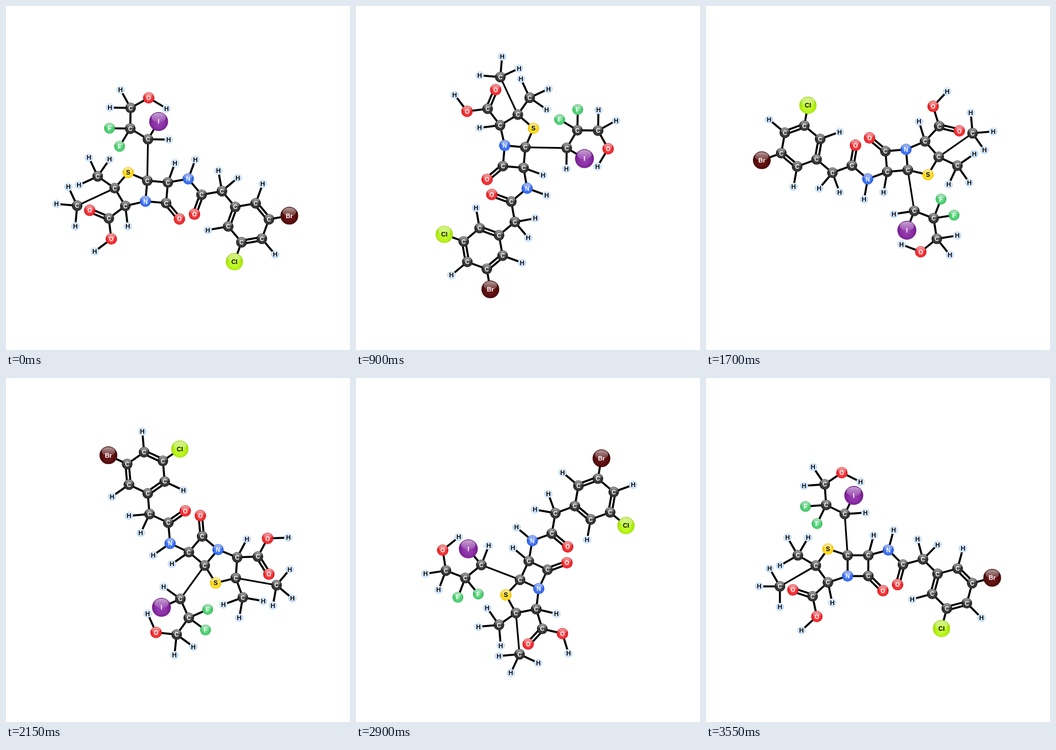
An HTML page for the animation above (3600 ms loop, 600 px wide and 600 px high).

```html
<!DOCTYPE html>
<html lang="en">
<head>
<meta charset="utf-8">
<title>Rotating molecule</title>
<style>
  html, body { margin: 0; width: 100%; height: 100%; overflow: hidden; background: #fff; }
  svg { display: block; width: 600px; height: 600px; }
  line { stroke: #000; }
  text { font: bold 11px "Liberation Sans", Arial, Helvetica, sans-serif; text-anchor: middle; }
</style>
</head>
<body>
<svg id="stage" viewBox="0 0 600 600">
  <defs>
    <linearGradient id="gloss" x1="0" y1="0" x2="0" y2="1">
      <stop offset="0" stop-color="#fff" stop-opacity=".6"/>
      <stop offset="1" stop-color="#fff" stop-opacity=".1"/>
    </linearGradient>
  </defs>
  <g id="bonds"></g>
  <g id="atoms"></g>
</svg>
<script>
const CENTER = 300, BOND = 36.1, STEPS = 72, STEP_MS = 50;
const RAD = Math.PI / 180;

// radius, inner colour, middle colour, rim colour, label colour
const ELEMENTS = {
  H:  [7.3, '#e2efff', '#d0e5ff', '#b9d7fb', '#000'],
  C:  [9.3, '#4a4a4a', '#363636', '#202020', '#fff'],
  N:  [9.8, '#5588ff', '#3f72f2', '#2858d8', '#fff'],
  O:  [10, '#ff5050', '#f03236', '#d8181e', '#fff'],
  F:  [9.5, '#6be08a', '#50d075', '#38b85c', '#fff'],
  S:  [10, '#ffe84a', '#ffdc20', '#efc008', '#000'],
  Cl: [15, '#cbff3c', '#b9f51c', '#9fdc08', '#000'],
  Br: [15.5, '#701c1c', '#5c1010', '#420606', '#fff'],
  I:  [16.5, '#9c44b4', '#8a2ea4', '#701c8a', '#fff']
};

const bondLayer = document.getElementById('bonds');
const atomLayer = document.getElementById('atoms');
const defs = document.querySelector('defs');
const atoms = [];

function make(tag, attrs, parent) {
  const node = document.createElementNS('http://www.w3.org/2000/svg', tag);
  for (const key in attrs) node.setAttribute(key, attrs[key]);
  return parent.appendChild(node);
}

function link(a, b, order = 1) {
  const dx = b.x - a.x, dy = b.y - a.y, len = Math.hypot(dx, dy);
  const width = len > BOND * 1.5 ? 3 : 3.5;
  for (const off of order === 2 ? [-3, 3] : [0]) {
    const ox = -dy / len * off, oy = dx / len * off;
    make('line', {
      x1: a.x + ox, y1: a.y + oy, x2: b.x + ox, y2: b.y + oy, 'stroke-width': width
    }, bondLayer);
  }
}

function place(el, x, y) {
  const [r, , , , ink] = ELEMENTS[el];
  const node = make('g', {}, atomLayer);
  make('circle', { r, fill: `url(#ball${el})` }, node);
  make('ellipse', { cy: -r * .42, rx: r * .76, ry: r * .5, fill: 'url(#gloss)' }, node);
  const size = ink === '#fff' && el.length === 1 ? 10.5 : 11;
  make('text', { y: 3.9, fill: ink, style: `font-size:${size}px` }, node).textContent = el;
  const atom = { x, y, node };
  atoms.push(atom);
  return atom;
}

function grow(el, from, deg, order = 1, reach = 1) {
  const d = BOND * reach, a = deg * RAD;
  const atom = place(el, from.x + d * Math.cos(a), from.y + d * Math.sin(a));
  link(from, atom, order);
  return atom;
}

const hydrogens = (from, ...degs) => degs.forEach(deg => grow('H', from, deg));

for (const el in ELEMENTS) {
  const g = make('radialGradient', { id: 'ball' + el, cy: '.58' }, defs);
  [0, .6, 1].forEach((offset, i) =>
    make('stop', { offset, 'stop-color': ELEMENTS[el][i + 1] }, g));
}

// fused four- and five-membered rings
const hub = place('C', 247, 309.3);
const alpha = grow('C', hub, 0);
const lactam = grow('C', alpha, 90);
const ringN = grow('N', lactam, 180);
link(ringN, hub);
const sulfur = grow('S', hub, 198);
const quat = grow('C', sulfur, 126);
const acidBase = grow('C', ringN, 162);
link(quat, acidBase);
grow('O', lactam, 45, 2);
hydrogens(alpha, 285);

// amide side chain
const amideN = grow('N', alpha, 345);
hydrogens(amideN, 285);
const amideC = grow('C', amideN, 45);
grow('O', amideC, 105, 2);
const bridge = grow('C', amideC, 345);
hydrogens(bridge, 255, 315);

// six-membered ring
const ring = [grow('C', bridge, 45)];
for (let i = 0; i < 5; i++) ring.push(grow('C', ring[i], 345 + 60 * i, 1 + i % 2));
link(ring[5], ring[0], 2);
['H', 'Br', 'H', 'Cl', 'H'].forEach((el, i) => grow(el, ring[i + 1], 285 + 60 * i));

// methyl groups
hydrogens(grow('C', quat, 210), 240, 300, 150);
hydrogens(grow('C', quat, 150, 1, 2), 240, 180, 90);

// acid group
const acid = grow('C', acidBase, 138);
grow('O', acid, 198, 2);
hydrogens(grow('O', acid, 78), 138);
hydrogens(acidBase, 78);

// halogenated alcohol chain
const iodo = grow('C', hub, 266, 1, 2);
grow('I', iodo, 296);
hydrogens(iodo, 356);
const fluoro = grow('C', iodo, 206);
grow('F', fluoro, 176);
grow('F', fluoro, 116);
const tail = grow('C', fluoro, 266);
hydrogens(tail, 176, 236);
hydrogens(grow('O', tail, 326), 26);

let shown = -1;

function draw(ms) {
  const step = Math.floor(ms / STEP_MS) % STEPS;
  if (step === shown) return;
  shown = step;
  const deg = (step + 1) * 360 / STEPS;
  const c = Math.cos(deg * RAD), s = Math.sin(deg * RAD);
  bondLayer.setAttribute('transform', `rotate(${deg} ${CENTER} ${CENTER})`);
  for (const { x, y, node } of atoms) {
    const dx = x - CENTER, dy = y - CENTER;
    const px = CENTER + dx * c - dy * s, py = CENTER + dx * s + dy * c;
    node.setAttribute('transform', `translate(${px.toFixed(2)} ${py.toFixed(2)})`);
  }
}

function tick(now) {
  draw(now);
  requestAnimationFrame(tick);
}

draw(0);
requestAnimationFrame(tick);
</script>
</body>
</html>
```
